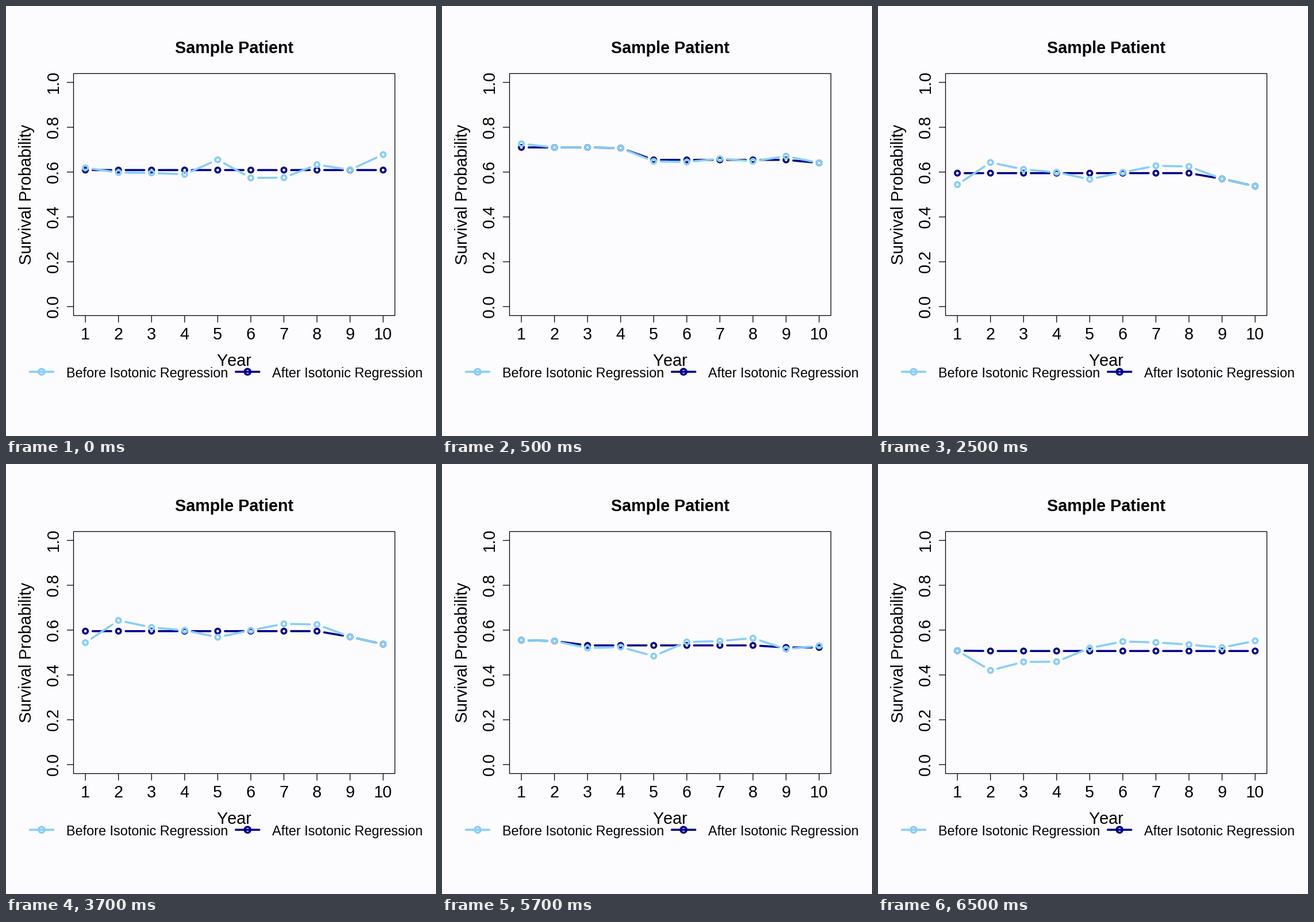
Recreate the animation shown at these times as a matplotlib script. Size 748 by 748 pixels, loop 8000 ms.

```python
import numpy as np
import matplotlib.pyplot as plt
from matplotlib.animation import FuncAnimation
from matplotlib.collections import LineCollection
from matplotlib.patches import Circle, Rectangle

SIZE = 748
STEP_MS, FRAMES = 500, 16
STEPS_PER_PATIENT, FIRST_STEP = 4, 3  # the loop opens late in the first patient
LIGHT, DARK = "#87CEFA", "#00008B"
STROKE, RADIUS, GAP = 3.6, 4.2, 12.6
YEARS = np.arange(1, 11)

# Yearly survival of each patient, and the first-year value the fit starts from
PATIENTS = [
    (.581, [.619, .598, .596, .590, .655, .574, .575, .633, .610, .678]),
    (.710, [.726, .710, .710, .707, .648, .645, .660, .648, .671, .641]),
    (.488, [.544, .643, .612, .599, .568, .599, .628, .625, .570, .537]),
    (.555, [.555, .551, .520, .524, .484, .547, .551, .564, .515, .530]),
    (.508, [.508, .420, .458, .459, .520, .549, .545, .535, .522, .552]),
]

plt.rcParams.update({
    "font.family": "Liberation Sans",
    "text.kerning_factor": 6,
    "path.snap": False,
})
fig = plt.figure(figsize=(SIZE / 72, SIZE / 72), dpi=72, facecolor="#fcfcfe")
ax = fig.add_axes([0, 0, 1, 1])
ax.set(xlim=(-0.5, SIZE - 0.5), ylim=(SIZE - 0.5, -0.5))
ax.axis("off")


def isotonic(values):
    """Non-increasing least-squares fit by the min-max formula."""
    n = len(values)
    return [min(max(np.mean(values[a:b + 1]) for b in range(i, n))
                for a in range(i + 1)) for i in range(n)]


def year_x(year):
    return 137.6 + 57.55 * (year - 1)


def prob_y(p):
    return 522.4 - 390 * np.asarray(p)


def label(x, y, text, size=28.8, **style):
    style = {"ha": "center", "va": "baseline", "rotation_mode": "anchor", **style}
    ax.text(x, y, text, size=size, color="black", **style)


def line(xs, ys, color="black", width=1.3, cap="butt"):
    ax.plot(xs, ys, color=color, lw=width, solid_capstyle=cap)


def ring(x, y, color, radius=RADIUS, zorder=3):
    return ax.add_patch(Circle((x, y), radius, fill=False, ec=color,
                               lw=STROKE, zorder=zorder))


class Series:
    """Rings joined by segments that stop short of each ring."""

    def __init__(self, color, zorder):
        self.links = ax.add_collection(LineCollection(
            [], colors=color, linewidths=STROKE, capstyle="round", zorder=zorder))
        self.rings = [ring(0, 0, color, zorder=zorder) for _ in YEARS]
        self.artists = [self.links, *self.rings]

    def update(self, probs):
        points = np.column_stack([year_x(YEARS), prob_y(probs)])
        delta = np.diff(points, axis=0)
        offset = GAP * delta / np.hypot(*delta.T)[:, None]
        self.links.set_segments(
            np.stack([points[:-1] + offset, points[1:] - offset], axis=1))
        for r, point in zip(self.rings, points):
            r.center = point


def draw_axes():
    ax.add_patch(Rectangle((117, 117), 559, 421, fill=False, ec="black", lw=1.3))
    for year in YEARS:
        line([year_x(year)] * 2, [538, 550])
        label(year_x(year), 580, str(year))
    for p in np.arange(6) / 5:
        line([105.5, 117], [prob_y(p)] * 2)
        label(90, prob_y(p) - 1, f"{p:.1f}", rotation=90)
    label(396.5, 81, "Sample Patient", weight="bold")
    label(396.5, 626, "Year")
    label(44, 327, "Survival Probability", rotation=90)


def draw_legend():
    for x, word, color in [(61.5, "Before", LIGHT), (419.7, "After", DARK)]:
        line([x - 20.5, x + 20.5], [635.8] * 2, color, STROKE, "round")
        ring(x, 635.8, color, 5)
        label(x + 42.7, 645.5, f"{word} Isotonic Regression", 23.4, ha="left")


draw_axes()
draw_legend()
after = Series(DARK, 4)
before = Series(LIGHT, 5)


def update(step):
    start, probs = PATIENTS[(step + FIRST_STEP) // STEPS_PER_PATIENT]
    before.update(probs)
    after.update(isotonic([start, *probs[1:]]))
    return after.artists + before.artists


anim = FuncAnimation(fig, update, frames=FRAMES, interval=STEP_MS,
                     repeat=True, repeat_delay=0, blit=False)
plt.show()
```
